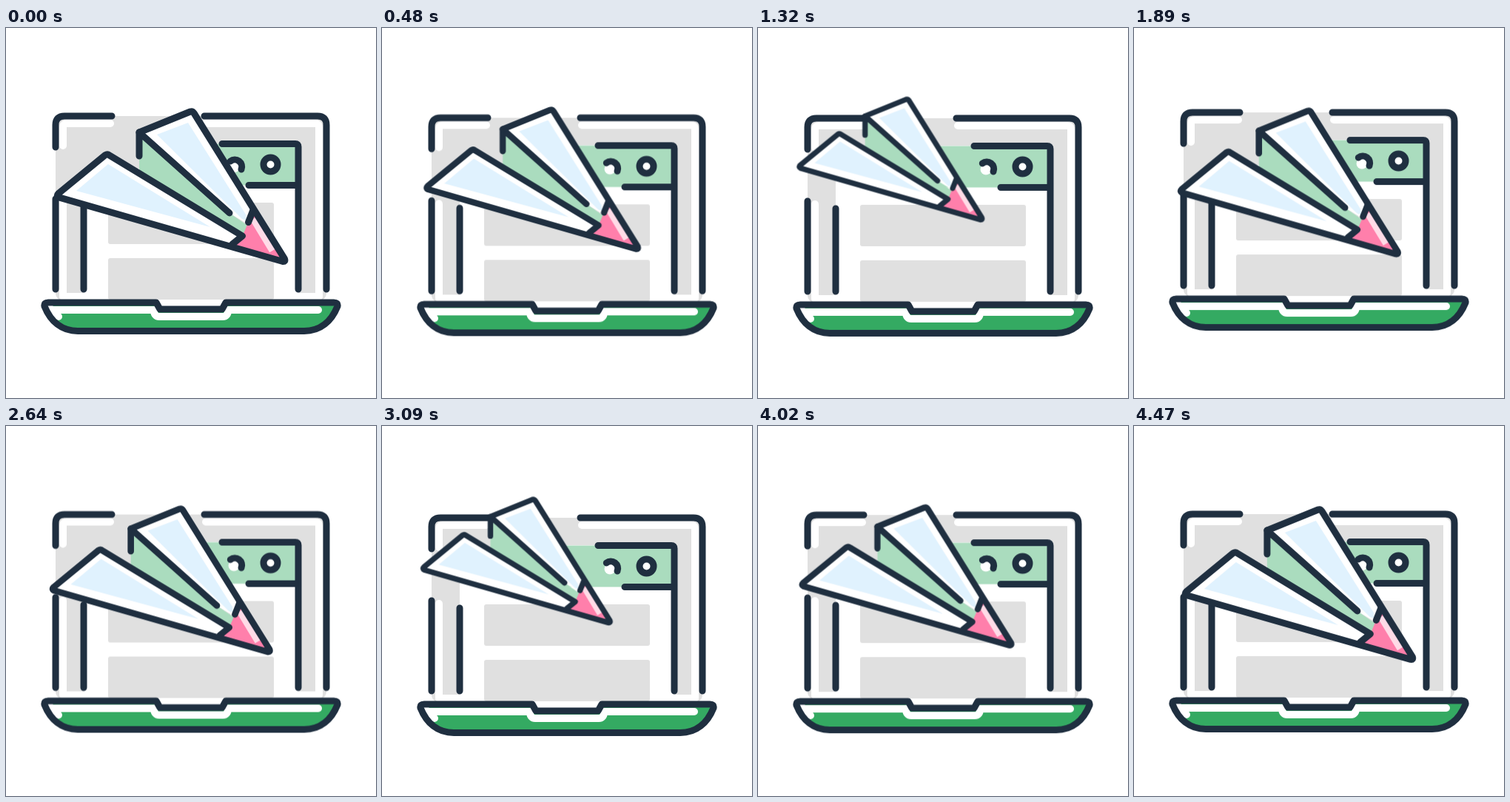
An HTML page that plays this animation: 500 by 500 pixels, repeating every 4.5 s.

```html
<!DOCTYPE html>
<html lang="en">
<head>
<meta charset="utf-8">
<title>Paper plane over laptop</title>
<style>
@property --u { syntax: "<number>"; inherits: false; initial-value: 0; }
html, body { margin: 0; width: 100%; height: 100%; overflow: hidden; background: #fff; }
svg { display: block; width: 100%; height: 100%; }

.ink, .shine { fill: none; stroke-linecap: round; stroke-linejoin: round; }
.ink { stroke: #1f2f40; stroke-width: 9; }
.shine { stroke: #fff; stroke-width: 10; }
.grey { fill: #e0e0e0; }
.white { fill: #fff; }
.mint { fill: #aadcbe; }
.green { fill: #34aa62; }
.sky { fill: #e0f2fe; }
.pink { fill: #ff7fab; }

.laptop { animation: bob 4.5s cubic-bezier(.37, 0, .63, 1) infinite; }
@keyframes bob {
  0%, 100% { transform: translateY(0); }
  22.2% { transform: translateY(5px); }
  47.1% { transform: translateY(-6px); }
  67.8% { transform: translateY(5px); }
}

/* --u runs 0 to 1 along a curved path while the plane shrinks */
.plane {
  transform-origin: 377px 315px;
  transform:
    translate(calc((19 * var(--u) - 96) * var(--u) * 1px), calc((-18 * var(--u) - 42) * var(--u) * 1px))
    scale(calc(1 - .207 * var(--u)));
  animation: fly 1.125s cubic-bezier(.45, 0, .55, 1) 15ms infinite alternate;
}
@keyframes fly { from { --u: 0; } to { --u: 1; } }
</style>
</head>
<body>
<svg viewBox="0 0 500 500">
  <defs>
    <path id="base" d="M57 371H203l5 9H292l5-9H443q6 0 5 5C440 396 425 409.500 403 409.500H97C75 409.500 60 396 52 376q-1-5 5-5Z"/>
  </defs>

  <g class="laptop">
    <!-- screen -->
    <rect class="grey" x="67" y="119" width="366" height="250" rx="11"/>
    <path class="shine" d="M77 159V134q0-5 5-5H141"/>
    <path class="shine" d="M270 129H418q5 0 5 5V363H77V235"/>

    <!-- browser window -->
    <path class="white" d="M105 190H215V156H395V369H105Z"/>
    <path class="mint" d="M215 156.500H395V212.500H215Z"/>
    <rect class="grey" x="138" y="236" width="224" height="56" rx="3"/>
    <rect class="grey" x="138" y="311" width="224" height="56" rx="3"/>
    <circle class="white" cx="308" cy="188" r="7.500"/>
    <path class="ink" d="M303.300 180A9.500 9.500 0 0 1 318 191"/>
    <circle class="white" cx="357.500" cy="184.500" r="9"/>
    <circle class="ink" cx="357.500" cy="184.500" r="9.500"/>
    <path class="ink" d="M292 156.500H391q4 0 4 4V353M328 212.500H395M105 241V353"/>
    <path class="ink" d="M67 161V131q0-12 12-12H143M268 119H421q12 0 12 12V353M67 231V353"/>

    <!-- base -->
    <use href="#base" class="green"/>
    <path class="shine" d="M60 379L71 390M62 381H200q0 9 7 9H293q7 0 7-9H422"/>
    <use href="#base" class="ink"/>
  </g>

  <g class="plane">
    <path class="mint" d="M180 141L302 250L328 268L320 280L180 196Z"/>
    <path class="white" d="M180 141L252 112L334 246L328 266L302 250Z"/>
    <path class="sky" d="M204 144L246 128L324 252L325 260L319 258Z"/>
    <path class="pink" d="M334 247L376 315L304 293L320 280Z"/>
    <path d="M334 258L360 301" fill="none" stroke="#ffdbe7" stroke-width="9"/>
    <path class="white" d="M70 226L136 171L319 281L304 293Z"/>
    <path class="sky" d="M95 220L138 184L276 269Z"/>
    <path class="ink" d="M180 173V141L302 250M334 246L327.500 262.500"/>
    <path class="ink" d="M180 141L249 113q3-1 5 2L376.500 312q1.500 4-2.500 3.500L71.500 228.800q-4-2-.8-5L134 171.800q3-2 5.500 0L319.500 281L306 292"/>
  </g>
</svg>
</body>
</html>
```
